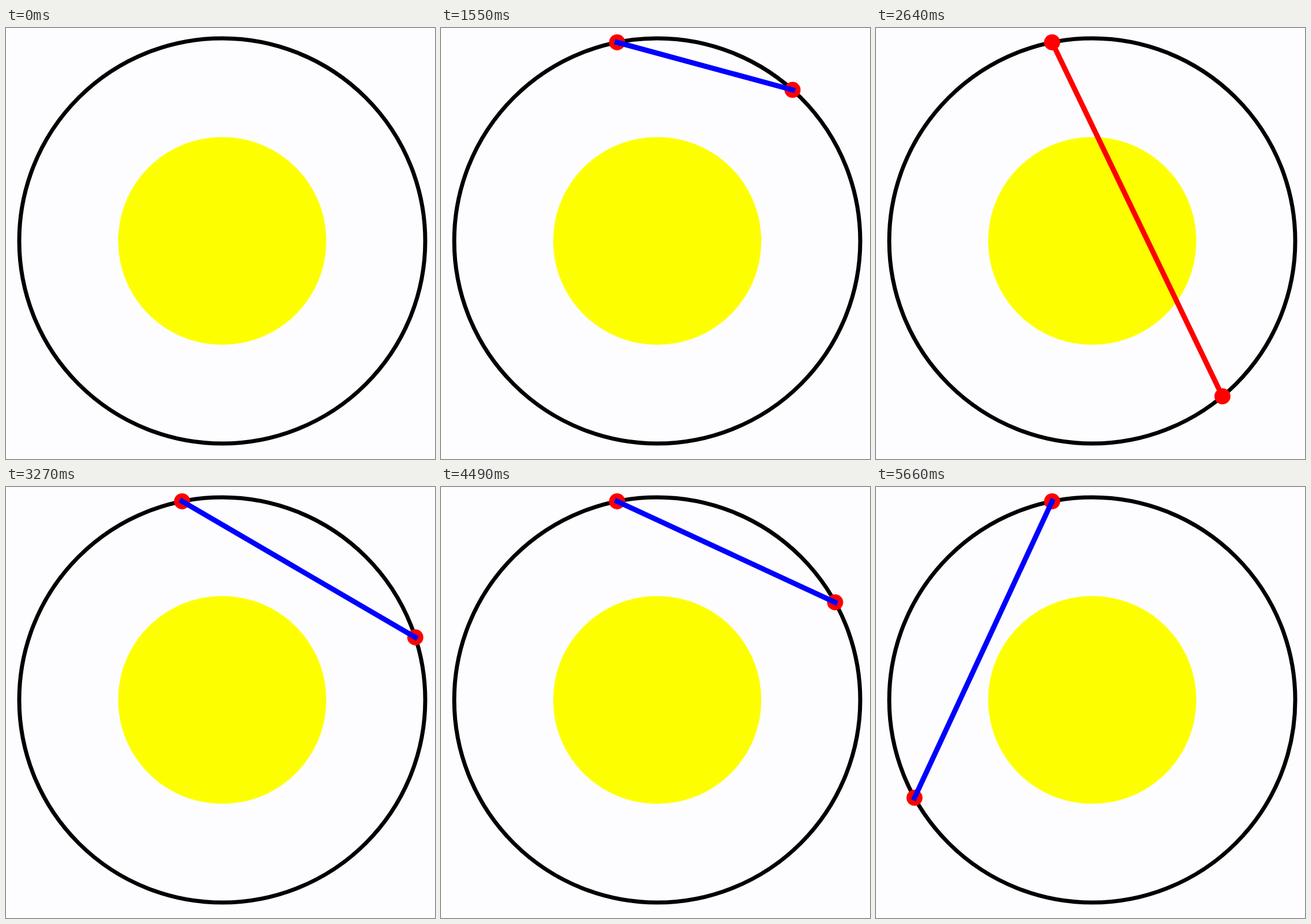
An HTML page for the animation above (6080 ms loop, 746x751 px).

```html
<!DOCTYPE html>
<html lang="en">
<head>
<meta charset="utf-8">
<title>Random chords</title>
<style>
  html, body { margin: 0; width: 100%; height: 100%; overflow: hidden; background: #fdfdff; }
  svg { display: block; }
</style>
</head>
<body>
<svg width="746" height="751" viewBox="0 0 746 751">
  <circle cx="376" cy="371" r="181" fill="#fdff00"/>
  <circle cx="376" cy="371" r="353" fill="none" stroke="#000" stroke-width="7"/>
  <circle id="anchor" r="14" fill="#f00"/>
  <circle id="end" r="14" fill="#f00"/>
  <line id="chord" stroke-width="9" stroke-linecap="square"/>
</svg>
<script>
const LOOP = 6080, CX = 376, CY = 371, RADIUS = 353, INNER = 181;
const ANCHOR = 348.6;

// Each spin hops through clockwise angles (degrees from the top) and rests on the last.
const spins = [
  { from: 130, to: 550, angles: [215, 73, 302, 8, 130, 254, 48, 166, 325, 112, ANCHOR] },
  { from: 1300, to: 1550, angles: [220, 146, 315, 28, 225, 41.8] },
  { from: 2270, to: 2640, angles: [244, 114, 320, 166, 30, 66, 205, 300, 140.1] },
  { from: 3270, to: 3610, angles: [72, 218, 35, 305, 108, 232, 125, 330, 243.1] },
  { from: 4280, to: 4490, angles: [25, 310, 50, 330, 40, 61.2] },
  { from: 5290, to: 5660, angles: [103, 300, 50, 252, 113, 320, 77, 241.1] }
];

const [anchor, end, chord] = ["anchor", "end", "chord"].map(id => document.getElementById(id));
const radians = degrees => degrees * Math.PI / 180;
const pointAt = degrees => ({
  x: CX + RADIUS * Math.sin(radians(degrees)),
  y: CY - RADIUS * Math.cos(radians(degrees))
});

function setAttributes(node, values) {
  for (const name in values) node.setAttribute(name, values[name]);
}

function angleAt({ from, to, angles }, time) {
  const last = angles.length - 1;
  const hop = Math.floor((time - from) / (to - from) * last + 1e-6);
  return angles[Math.min(hop, last)];
}

function placeDot(dot, degrees) {
  const visible = degrees !== null;
  dot.style.display = visible ? "" : "none";
  if (visible) {
    const { x, y } = pointAt(degrees);
    setAttributes(dot, { cx: x, cy: y });
  }
}

function placeChord(startAngle, endAngle) {
  chord.style.display = endAngle === null ? "none" : "";
  if (endAngle === null) return;
  const a = pointAt(startAngle), b = pointAt(endAngle);
  const distance = RADIUS * Math.abs(Math.cos(radians(endAngle - startAngle) / 2));
  setAttributes(chord, {
    x1: a.x, y1: a.y, x2: b.x, y2: b.y,
    stroke: distance < INNER ? "#f00" : "#00f"
  });
}

function render(time) {
  const index = spins.findLastIndex(spin => time >= spin.from);
  const startAngle = index < 0 ? null : angleAt(spins[0], time);
  const endAngle = index < 1 ? null : angleAt(spins[index], time);
  placeDot(anchor, startAngle);
  placeDot(end, endAngle);
  placeChord(startAngle, endAngle);
}

const started = performance.now();
function tick() {
  render((performance.now() - started) % LOOP);
  requestAnimationFrame(tick);
}
tick();
</script>
</body>
</html>
```
